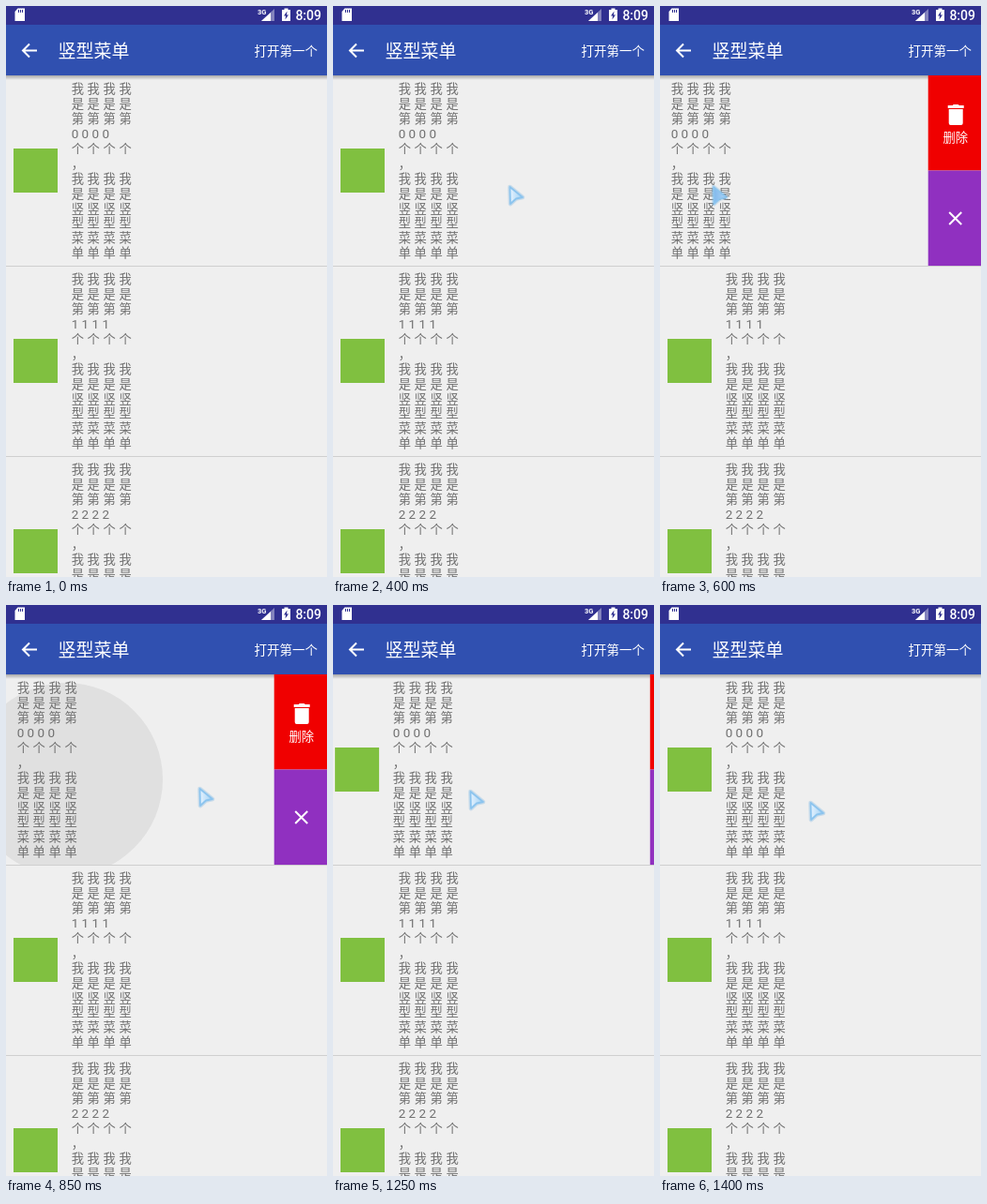
Write an HTML page with a canvas that moves like this. It is 342x609 px and loops after 1450 ms.

```html
<!DOCTYPE html>
<html lang="zh-CN">
<head>
<meta charset="utf-8">
<title>竖型菜单</title>
<style>
  html, body { margin: 0; width: 100%; height: 100%; overflow: hidden; background: #efefef; }
  canvas { display: block; }
</style>
</head>
<body>
<canvas id="stage" width="342" height="609"></canvas>
<script>
const ctx = document.getElementById('stage').getContext('2d');
const W = 342, H = 609, LOOP = 1450, STEP = 50;
const LIST_TOP = 74, ROW_HEIGHT = 203, MENU_WIDTH = 58;
const OPEN_AT = 500, TAP_AT = 600, CLOSE_AT = 1100, CLOSE_TIME = 167;
const STATUS_BLUE = '#303090';
const CJK = '"Noto Sans CJK SC", "Noto Sans CJK", sans-serif';
const LATIN = 'Roboto, "Noto Sans", sans-serif';

// The pointer eases from one stop to the next
const stops = [
  { at: 50, x: 285, y: 215 },
  { at: 400, x: 187, y: 191 },
  { at: 575, x: 52, y: 191 },
  { at: 850, x: 205, y: 194 },
  { at: CLOSE_AT, x: 205, y: 194 },
  { at: 1250, x: 145, y: 197 },
  { at: 1400, x: 159, y: 209 }
];

const clamp = v => Math.min(1, Math.max(0, v));
const progress = (time, start, end) => clamp((time - start) / (end - start));
const smooth = p => p * p * (3 - 2 * p);

function pointerAt(time) {
  const next = Math.max(1, stops.findIndex(stop => stop.at >= time));
  const a = stops[next - 1], b = stops[next];
  const p = smooth(progress(time, a.at, b.at));
  return { x: a.x + (b.x - a.x) * p, y: a.y + (b.y - a.y) * p };
}

function swipeOffset(time) {
  if (time < OPEN_AT) return 0;
  return -MENU_WIDTH * (1 - progress(time, CLOSE_AT, CLOSE_AT + CLOSE_TIME));
}

function rect(x, y, w, h, color) {
  ctx.fillStyle = color;
  ctx.fillRect(x, y, w, h);
}

function fillPath(d, color = '#fff') {
  ctx.fillStyle = color;
  ctx.fill(new Path2D(d));
}

function strokePath(d, color = '#fff', width = 2) {
  ctx.strokeStyle = color;
  ctx.lineWidth = width;
  ctx.stroke(new Path2D(d));
}

function label(text, x, y, font, color = '#fff', align = 'left') {
  ctx.font = font;
  ctx.fillStyle = color;
  ctx.textAlign = align;
  ctx.fillText(text, x, y);
}

function drawItem(index, offset) {
  const top = index * ROW_HEIGHT;
  rect(8 + offset, top + 152, 47, 47, '#80c040');
  [...`我是第${index}个，我是竖型菜单`].forEach((char, line) => {
    const isDigit = /\d/.test(char);
    const font = isDigit ? `13.5px ${LATIN}` : `13.3px ${CJK}`;
    const pitch = isDigit ? 10.9 : 16.9;
    const copies = char === '，' ? 1 : 4;
    for (let i = 0; i < copies; i++) {
      label(char, 69.7 + offset + i * pitch, top + 93.3 + line * 15.9, font, '#707070');
    }
  });
  rect(0, top + 277, W, 1, '#cfcfcf');
}

function drawRipple(time) {
  if (time >= CLOSE_AT) return;
  const radius = 103 * progress(time, TAP_AT, 850);
  ctx.save();
  ctx.beginPath();
  ctx.rect(0, LIST_TOP, W, ROW_HEIGHT);
  ctx.clip();
  ctx.beginPath();
  ctx.arc(64, 186, radius, 0, Math.PI * 2);
  ctx.fillStyle = '#e0e0e0';
  ctx.fill();
  ctx.restore();
}

function drawMenu(offset) {
  if (!offset) return;
  ctx.save();
  ctx.translate(343.7 + offset, LIST_TOP);
  rect(0, 0, MENU_WIDTH, 101.5, '#f00000');
  rect(0, 101.5, MENU_WIDTH, 101.5, '#9030c0');
  // Trash can, then cross
  fillPath('M21 32h5l1-1h5l1 1h5v3h-17zM22 36h15v15q0 2-2 2h-11q-2 0-2-2z');
  label('删除', 29, 71, `13.3px ${CJK}`, '#fff', 'center');
  strokePath('M22.5 146l13 13m0-13l-13 13');
  ctx.restore();
}

function drawStatusBar() {
  rect(0, 0, W, 20, STATUS_BLUE);
  // Memory card
  fillPath('M12.5 2.5H20V16H9.5V6z');
  for (let x = 13; x < 18; x += 2) rect(x, 4, 1, 3, STATUS_BLUE);
  // Signal and charging battery
  label('3G', 268, 9, `bold 7.5px ${LATIN}`);
  fillPath('M286 3v13h-14z', 'rgba(255,255,255,.4)');
  fillPath('M282 7v9h-10z');
  fillPath('M296.5 2.5h4v1.5h2.5v12h-9v-12h2.5z');
  fillPath('M299.5 5.5l-3.5 5h2l-.5 4 3.5-5h-2z', STATUS_BLUE);
  label('8:09', 336, 14.5, `500 14px ${LATIN}`, '#fff', 'right');
}

function drawToolbar() {
  rect(0, 20, W, LIST_TOP - 20, '#3050b0');
  strokePath('M33 47.5H18.5M25 40.5l-7 7 7 7');
  label('竖型菜单', 55.5, 55, `19px ${CJK}`);
  label('打开第一个', 332, 52.5, `13.5px ${CJK}`, '#fff', 'right');
}

function drawShadow() {
  const fade = ctx.createLinearGradient(0, LIST_TOP, 0, LIST_TOP + 5);
  fade.addColorStop(0, 'rgba(0,0,0,.3)');
  fade.addColorStop(1, 'rgba(0,0,0,0)');
  rect(0, LIST_TOP, W, 5, fade);
}

function drawPointer(time) {
  if (time < stops[0].at) return;
  const { x, y } = pointerAt(time);
  const pressed = time > 400 && time <= TAP_AT;
  const arrow = 'M1.5 2L15 13L8 14.5L2 20z';
  const glass = ctx.createLinearGradient(1, 12, 14, 12);
  glass.addColorStop(0, pressed ? '#80b8ec' : '#e8f4ff');
  glass.addColorStop(1, pressed ? '#a8d0f4' : '#a4d2f4');
  ctx.save();
  ctx.translate(x, y);
  ctx.lineJoin = 'round';
  strokePath(arrow, 'rgba(120,180,225,.35)', 4.5);
  fillPath(arrow, glass);
  strokePath(arrow, '#8cc4ee', 1.8);
  ctx.restore();
}

function draw(time) {
  const offset = swipeOffset(time);
  rect(0, 0, W, H, '#efefef');
  drawRipple(time);
  for (let i = 0; i < 3; i++) drawItem(i, i ? 0 : offset);
  drawShadow();
  drawMenu(offset);
  drawToolbar();
  drawStatusBar();
  drawPointer(time);
}

// Time advances in steps, with two longer pauses
function steppedTime(time) {
  if (time >= 850 && time < 1150) return 850;
  if (time >= 1150 && time < 1250) return 1150;
  return Math.floor(time / STEP) * STEP;
}

function tick() {
  draw(steppedTime(performance.now() % LOOP));
  requestAnimationFrame(tick);
}
tick();
</script>
</body>
</html>
```
